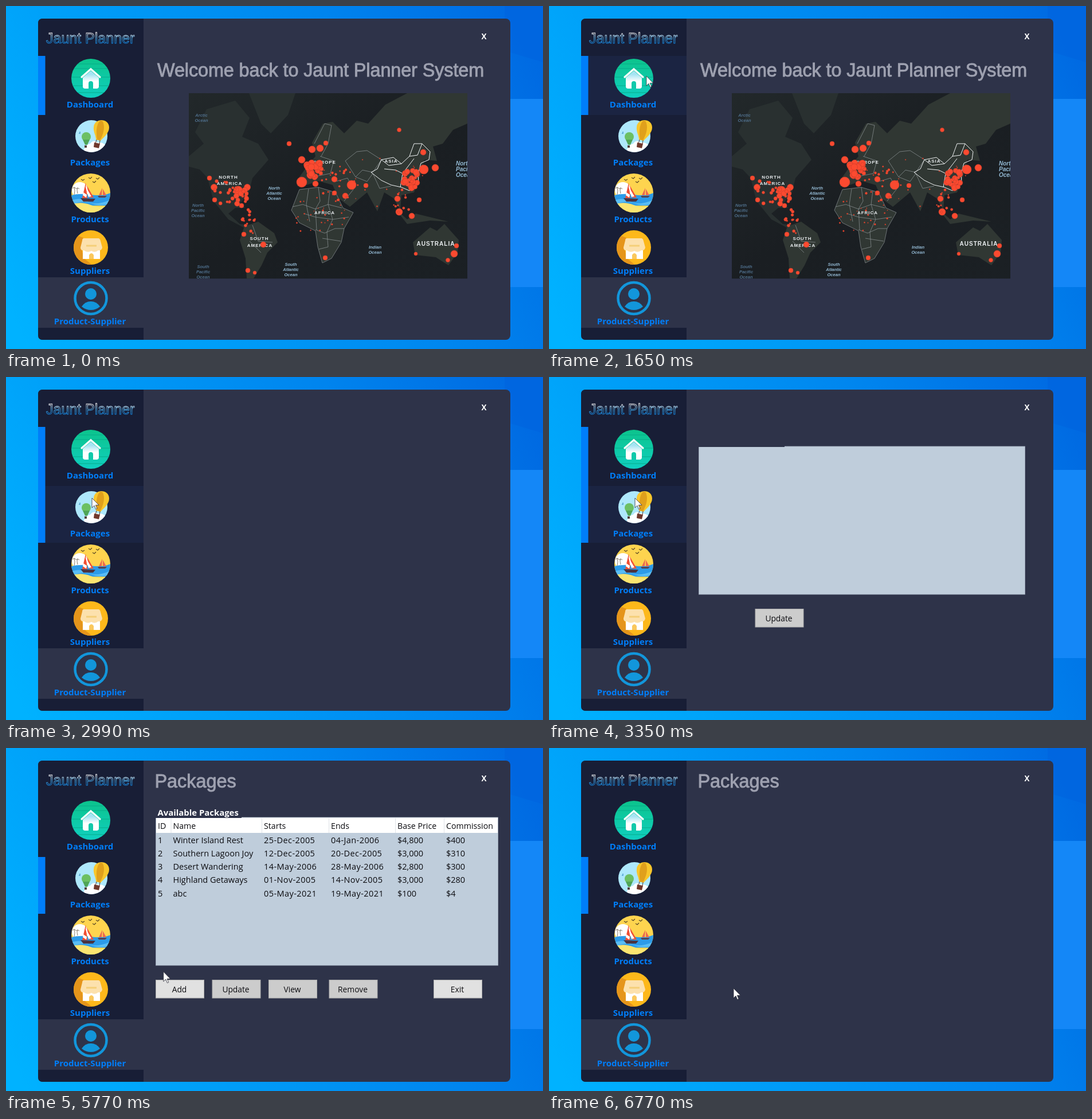
An HTML page for the animation above (8 s loop, 937 by 598 pixels).

```html
<!DOCTYPE html>
<html lang="en">
<head>
<meta charset="utf-8">
<title>Jaunt Planner</title>
<style>
html, body { margin: 0; width: 100%; height: 100%; overflow: hidden; background: #0098f4; }
svg { display: block; width: 100%; height: 100%; }
text { font-family: "Open Sans", "Noto Sans", sans-serif; }
.nav { font-size: 15px; font-weight: 700; fill: #007ef9; text-anchor: middle; }
.title { font: 32.4px "Liberation Sans", Arial, sans-serif; fill: #9ea1b0; stroke: #9ea1b0; stroke-width: .9; }
.logo { font: 25px "Liberation Sans", Arial, sans-serif; fill: none; stroke: url(#ink); stroke-width: .8; }
.land text { font: 700 8px "Liberation Sans", Arial, sans-serif; fill: #e8ecee; text-anchor: middle; letter-spacing: 1px; }
.land .sea { font-size: 7.5px; font-style: italic; fill: #93b9d3; letter-spacing: 0; }
.land .far { fill: #4f6f8c; }
.cell { font-size: 14.5px; fill: #0c0c10; }
.date { letter-spacing: .42px; }
.head { font-size: 14.2px; fill: #0c0c10; }
.btn { font-size: 13.8px; fill: #0c0c10; text-anchor: middle; }
</style>
</head>
<body>
<svg viewBox="0 0 937 598" preserveAspectRatio="none">
<defs>
  <linearGradient id="sky" gradientUnits="userSpaceOnUse" x1="0" y1="520" x2="937" y2="120">
    <stop offset="0" stop-color="#00b2ff"/><stop offset=".3" stop-color="#009ef8"/>
    <stop offset=".7" stop-color="#0084ee"/><stop offset="1" stop-color="#006ae2"/>
  </linearGradient>
  <linearGradient id="ink" gradientUnits="userSpaceOnUse" x1="0" y1="46" x2="0" y2="66">
    <stop offset=".1" stop-color="#fff"/><stop offset=".55" stop-color="#4ab4f4"/><stop offset="1" stop-color="#0a86e8"/>
  </linearGradient>
  <linearGradient id="photo" x1="0" y1="0" x2="1" y2="1">
    <stop offset="0" stop-color="#22282a"/><stop offset=".5" stop-color="#1a1e22"/><stop offset="1" stop-color="#1b2024"/>
  </linearGradient>
  <linearGradient id="green" x1="0" y1="0" x2="0" y2="1">
    <stop offset="0" stop-color="#0cc48c"/><stop offset="1" stop-color="#10cfc0"/>
  </linearGradient>
  <linearGradient id="wall" x1="0" y1="0" x2="0" y2="1">
    <stop offset=".2" stop-color="#a5e4f3"/><stop offset=".6" stop-color="#fff"/>
  </linearGradient>
  <clipPath id="frame"><rect x="319" y="152" width="486" height="323.500"/></clipPath>
  <clipPath id="disc1"><circle cx="148" cy="126" r="34"/></clipPath>
  <clipPath id="disc2"><circle cx="149" cy="227" r="28"/></clipPath>
  <clipPath id="disc3"><circle cx="148" cy="326" r="34"/></clipPath>
  <clipPath id="disc4"><circle cx="148" cy="421" r="30"/></clipPath>
</defs>

<rect width="937" height="598" fill="url(#sky)"/>
<path d="M870 78L937 98V0H870Z" fill="#0058d6" opacity=".25"/>
<rect x="870" y="162" width="67" height="328" fill="#1487f7"/>

<rect x="56" y="22" width="824" height="560" rx="8" fill="#2e3349"/>
<path d="M240 22H64Q56 22 56 30V574Q56 582 64 582H240Z" fill="#181e36"/>
<rect x="56" y="473" width="184" height="88" fill="#2e3349"/>
<rect id="hover" x="56" width="184" fill="#1b2442"/>
<rect id="bar" x="56" width="12.500" fill="#007ef9"/>
<text class="logo" x="70" y="65">Jaunt Planner</text>
<text x="834" y="58" font-size="13.5" font-weight="700" fill="#fff" text-anchor="middle">X</text>

<g clip-path="url(#disc1)">
  <rect x="114" y="92" width="68" height="68" fill="url(#green)"/>
  <path d="M114 101H182M114 109H182M114 124H182M114 139H182M114 151H182" stroke="#07a988" stroke-width="2" opacity=".45"/>
</g>
<path d="M134 125L148 113 162 125V140Q162 144 158 144H138Q134 144 134 140Z" fill="url(#wall)"/>
<path d="M132 124L148 110 164 124" fill="none" stroke="#fff" stroke-width="3.200" stroke-linecap="round"/>
<path d="M144 144V135Q144 131 148 131T152 135V144Z" fill="#0fc9aa"/>

<g clip-path="url(#disc2)">
  <rect x="121" y="199" width="56" height="56" fill="#aee8fc"/>
  <path d="M134 256Q138 241 147 240 152 232 160 238 168 236 178 246V256Z" fill="#fff"/>
</g>
<circle cx="140" cy="228" r="8" fill="#6cc063"/><path d="M134 233L138 242H142L146 233Z" fill="#4fa557"/>
<rect x="137" y="243" width="4" height="4" fill="#54433d"/>
<path d="M153 211C154 195 180 195 180 212 180 222 169 230 165 235L157 233C157 226 152 219 153 211Z" fill="#f8c62c"/>
<path d="M164 200C157 207 157 222 159 233L164 234C170 224 174 209 168 200Z" fill="#e0a01c"/>
<path d="M158 233L156 240M164 234L163 241" stroke="#54352b"/>
<path d="M154 238L164 240 162 248 153 246Z" fill="#70382b"/>
<path d="M127 222H130M129 219V221" stroke="#247cb8"/>

<g clip-path="url(#disc3)">
  <rect x="114" y="292" width="68" height="68" fill="#fed44f"/>
  <circle cx="129" cy="321" r="14" fill="#fff"/>
  <path d="M114 330Q128 326 148 329T182 326V348H114Z" fill="#2c9be9"/>
  <path d="M114 339Q128 333 142 341T182 338V345Q162 350 148 344T114 347Z" fill="#59bdf5"/>
  <path d="M114 346Q130 340 148 347T182 345V360H114Z" fill="#fbe570"/>
</g>
<path d="M119 329Q121 322 119 316M125 327Q123 321 125 317M116 318L119 316 122 318M122 319L125 317 128 319" fill="none" stroke="#675944" stroke-width=".8"/>
<path d="M139 308L133 335H142ZM141 313L153 334H145Z" fill="#f04f34"/>
<path d="M138 313L144 333 149 332ZM135 325L141 329 140 334 134 330Z" fill="#fff"/>
<path d="M130 335L156 336 152 341H135Z" fill="#4a3442"/>
<path d="M168 317L162 330H167ZM169 319L175 330H169Z" fill="#ec6951"/><path d="M160 331H176L173 334H162Z" fill="#574452"/>
<path d="M131 302L134 304 137 302M144 299L147 301 150 298M151 306L154 308 157 305M157 300L160 302 163 299" fill="none" stroke="#594725" stroke-width="1.200"/>

<g clip-path="url(#disc4)">
  <rect x="118" y="391" width="60" height="60" fill="#fdb81b"/>
  <path d="M118 398L135 404 131 420 136 440 150 451H118Z" fill="#e5951b"/>
</g>
<rect x="134" y="418" width="30" height="23" fill="#fff"/>
<path d="M136 405H161Q164 405 165 410L168 421Q167 427 161 426 155 431 149 427 142 431 136 426 130 427 130 421L133 409Q133 405 136 405Z" fill="#fce1ad"/>
<path d="M140 418H158" stroke="#f4cf78" stroke-width="3"/>
<path d="M145 441V434Q149 428 153 434V441Z" fill="#fac85c"/>

<circle cx="148" cy="509.500" r="27.500" fill="none" stroke="#1296db" stroke-width="4.500"/>
<circle cx="148" cy="502" r="10" fill="#1296db"/>
<path d="M132 524Q138 515 148 515T164 524Q157 530 148 530T132 524Z" fill="#1296db"/>

<g id="nav"></g>

<g id="welcome">
  <text class="title" x="264" y="123" letter-spacing="-.1">Welcome back to Jaunt Planner System</text>
  <g class="land" clip-path="url(#frame)">
    <rect x="319" y="152" width="486" height="323.500" fill="url(#photo)"/>
    <path d="M319 262L345 240 330 220 350 180 400 165 425 195 412 228 440 240 458 268 430 300 424 325 408 345 418 352 400 352 388 362 408 380 425 382 418 388 388 372 362 340 352 300 338 285 319 280ZM424 152H505L492 190 462 222 445 205Z" fill="#293030"/>
    <g fill="#303733">
      <path d="M416 384L440 376 468 396 474 412 456 430 446 452 432 475H420L418 440 408 408Z"/>
      <path id="africa" d="M512 320L545 316 575 325 588 352 606 360 590 388 585 412 568 440 552 448 544 420 540 392 512 378 498 356Z"/>
      <path d="M508 314L512 298 525 280 540 262 534 238 553 205 570 202 590 222 612 200 632 205 662 172 700 152H805V205L780 216 762 240 745 245 752 270 730 268 722 300 712 325 690 330 688 355 676 335 660 325 648 358 630 325 600 350 580 335 570 312 545 305 525 312Z"/>
      <path d="M710 412L740 386 752 392 765 380 790 408 788 430 772 452 750 438 714 434ZM678 352L700 372 715 362 772 376 740 374 700 380Z"/>
    </g>
    <g fill="none" stroke="#c3cbd0" stroke-width=".7" opacity=".65">
      <use href="#africa"/>
      <path d="M500 350L518 346 540 354 562 346 586 352M528 319L524 346 530 376M545 316L548 340 540 354 542 390M565 322L562 346 570 372 560 394 562 420 546 424M540 390L556 396 574 388 590 388M520 362L540 368 570 372 598 368M552 405L584 410"/>
      <path d="M592 270L612 254 630 252 655 268 640 290 622 286 610 298ZM610 298L630 306 640 292 652 318 672 314M538 240L556 205 568 208 562 240 550 262M548 262L572 270 566 292 545 296M430 382L440 410 465 412M425 410L445 430M575 306L596 300 606 320 590 340"/>
    </g>
    <path d="M637 290L648 284 655 268 676 264 690 275 704 262 712 240 726 240 740 254 738 268 724 274 719 292 720 308 704 322 690 316 672 312 655 304ZM660 284L680 286 692 292 712 266M692 292L688 316M655 268L668 278 690 275M704 262L718 260 726 240" fill="none" stroke="#eef1f2"/>
    <g id="labels"></g>
    <g id="dots" fill="#fb4a30" stroke="#c93e2c" stroke-width=".6"></g>
  </g>
</g>

<g id="grid">
  <rect id="sheet" x="261.500" y="121" height="258" fill="#bfcddb" stroke="#a4afbd" stroke-width=".8"/>
  <g id="head"></g>
  <rect x="261" y="119" width="150" height="3" fill="#2e3349"/>
</g>
<g id="rows"></g>
<g id="buttons"></g>
<text id="title" class="title" x="259.500" y="69">Packages</text>
<text id="caption" x="264.500" y="117.500" font-size="14.900" font-weight="700" fill="#fff">Available Packages</text>

<circle id="click" r="15" fill="#eaff3c" opacity=".45"/>
<path id="cursor" d="M0 0V17L4 13.200 6.600 19.500 9 18.500 6.400 12.300H12Z" fill="#fff" stroke="#2a2a35" stroke-width=".8"/>
</svg>

<script>
const LOOP = 8000;
const $ = id => document.getElementById(id);
const label = (cls, x, y, s, extra = "") => `<text class="${cls}" x="${x}" y="${y}" ${extra}>${s}</text>`;
const show = (id, on) => $(id).setAttribute("visibility", on ? "visible" : "hidden");
const set = (id, attrs) => { for (const k in attrs) $(id).setAttribute(k, attrs[k]); };

$("nav").innerHTML = [["Dashboard", 176.5], ["Packages", 278], ["Products", 376.5],
  ["Suppliers", 466.5], ["Product-Supplier", 555]].map(([s, y]) => label("nav", 146.5, y, s)).join("");

// Map labels and markers
const seas = [["Arctic Ocean", 341, 193, " far"], ["North Atlantic Ocean", 468, 320, ""],
  ["North Pacific Ocean", 335, 350, " far"], ["South Pacific Ocean", 344, 457, " far"],
  ["South Atlantic Ocean", 497, 453, ""], ["Indian Ocean", 644, 423, ""]];
$("labels").innerHTML =
  [["NORTH", 388, 301], ["AMERICA", 390, 312], ["EUROPE", 556, 275], ["ASIA", 672, 273], ["AFRICA", 556, 363],
   ["SOUTH", 442, 408], ["AMERICA", 443, 420]].map(([s, x, y]) => label("", x, y, s)).join("") +
  label("", 750, 418, "AUSTRALIA", 'style="font-size:10px"') +
  seas.map(([s, x, y, cls]) => s.split(" ").map((w, i) => label("sea" + cls, x, y + i * 9, w)).join("")).join("") +
  ["North", "Pacific", "Ocean"].map((w, i) =>
    label("sea", 785, 278 + i * 10, w, 'style="font-size:10px;text-anchor:start"')).join("");

let seed = 7;
const rnd = () => (seed = seed * 16807 % 2147483647) / 2147483647;
const dot = (x, y, r) => `<circle cx="${x.toFixed(1)}" cy="${y.toFixed(1)}" r="${r.toFixed(1)}"/>`;
const cluster = (x, y, w, h, n, r) => Array.from({ length: n }, () => {
  const a = rnd() * 6.283, d = Math.sqrt(rnd());
  return dot(x + w * d * Math.cos(a), y + h * d * Math.sin(a), r * (.5 + rnd() * .7));
}).join("");
const spots = [[494,240,4], [516,268,6], [534,250,6], [548,248,6], [558,239,4], [686,216,3.5], [728,255,5], [729,285,8],
  [749,282,6], [603,312,8], [573,302,5], [628,313,4], [592,331,5], [573,326,4], [355,300,4], [363,316,5.5],
  [364,338,4], [421,316,5.5], [405,322,8], [411,348,4], [415,398,4], [449,416,5], [422,461,4], [434,465,3],
  [557,439,4], [683,336,5], [686,359,6], [708,366,5], [721,338,4], [782,432,6], [786,418,4], [771,443,3.5],
  [715,432,3], [516,307,9], [540,310,5]];
$("dots").innerHTML = spots.map(s => dot(...s)).join("") +
  cluster(537, 284, 14, 16, 34, 5) + cluster(403, 331, 20, 16, 20, 4) + cluster(384, 322, 26, 24, 12, 2.5) +
  cluster(706, 301, 14, 18, 28, 4.5) + cluster(692, 342, 14, 22, 8, 2) + cluster(420, 380, 18, 30, 14, 2.5) +
  cluster(548, 370, 46, 45, 28, 1.2) + cluster(580, 310, 34, 30, 20, 1.8) + cluster(650, 310, 110, 50, 18, 1.1);

// Package table
const cols = [265, 291.5, 450, 567, 683, 768];
$("head").innerHTML = '<rect id="strip" x="262" y="121.5" height="26.5" fill="#fff"/>' +
  ["ID", "Name", "Starts", "Ends", "Base Price", "Commission"].map((s, i) =>
    (i ? `<path d="M${cols[i] - 3.5} 122V148" stroke="#dfe3e8"/>` : "") + label("head", cols[i], 140.5, s)).join("");
$("rows").innerHTML = [
  "1|Winter Island Rest|25-Dec-2005|04-Jan-2006|$4,800|$400",
  "2|Southern Lagoon Joy|12-Dec-2005|20-Dec-2005|$3,000|$310",
  "3|Desert Wandering|14-May-2006|28-May-2006|$2,800|$300",
  "4|Highland Getaways|01-Nov-2005|14-Nov-2005|$3,000|$280",
  "5|abc|05-May-2021|19-May-2021|$100|$4"
].map((row, r) => row.split("|").map((s, c) =>
  label(c === 2 || c === 3 ? "cell date" : "cell", cols[c], 165.5 + r * 23.3, s)).join("")).join("");

$("buttons").innerHTML = [["Add", 261, "#e1e1e1"], ["Update", 359.5, "#ccc"], ["View", 458, "#ccc"],
  ["Remove", 563.5, "#ccc"], ["Exit", 746, "#e1e1e1"]].map(([s, x, fill]) =>
  `<g id="b${s}"><rect id="r${s}" x="${x + .5}" y="404.500" width="84" height="31.500" fill="${fill}" stroke="#adadad"/>` +
  label("btn", x + 41.5, 426, s) + "</g>").join("");

// Pointer keys: time, x, y
const path = [[30, 640, 559], [80, 640, 559], [130, 572, 541], [390, 572, 541], [640, 368, 253], [880, 368, 253],
  [1250, 215, 150], [1600, 170, 122], [1650, 170, 122], [1700, 165, 126], [1950, 153, 174], [2060, 153, 174],
  [2600, 150, 211], [4380, 150, 211], [4570, 150, 327], [5530, 150, 327], [5870, 326, 416], [5980, 326, 416],
  [6180, 322, 419]];
function pointer(t) {
  const i = path.findIndex(k => k[0] > t);
  if (i < 0) return path[path.length - 1].slice(1);
  if (!i) return path[0].slice(1);
  const [t0, x0, y0] = path[i - 1], [t1, x1, y1] = path[i], p = (t - t0) / (t1 - t0);
  return [x0 + (x1 - x0) * p, y0 + (y1 - y0) * p];
}

const edges = [87, 190, 289, 385, 473];
function draw(t) {
  const [x, y] = pointer(t);
  set("cursor", { transform: `translate(${x} ${y})` });
  show("cursor", t >= 30);
  set("click", { cx: x, cy: y });
  show("click", t >= 2650 && t < 2860);

  const n = edges.findIndex((e, i) => y >= e && y < edges[i + 1]);
  const over = x > 56 && x < 240 && n >= 0;
  show("hover", over);
  if (over) set("hover", { y: edges[n], height: edges[n + 1] - edges[n] });

  const top = t < 3600 ? 87 : 190, end = t < 2910 ? 190 : 289;
  set("bar", { y: top, height: end - top });

  const open = t < 6770, full = t >= 3600 && open, mid = t >= 3390 && open;
  show("welcome", t < 2910);
  show("grid", t >= 3350 && open);
  show("head", mid);
  const w = t < 3390 ? 569 : t < 3600 ? 588 : 597;
  set("sheet", { width: w });
  set("strip", { width: w - 1 });
  show("bUpdate", t >= 3350 && open);
  for (const s of ["Add", "View", "Remove", "Exit"]) show("b" + s, mid);
  show("rows", full);
  show("caption", full);
  show("title", t >= 3600);

  const hot = x > 261 && x < 346 && y > 404 && y < 436;
  const down = t >= 6570 && t < 6670;
  set("rAdd", { fill: down ? "#cce4f7" : hot ? "#e5f1fb" : "#e1e1e1", stroke: hot ? "#0078d7" : "#adadad" });
}

function tick(now) {
  draw(now % LOOP);
  requestAnimationFrame(tick);
}
draw(0);
requestAnimationFrame(tick);
</script>
</body>
</html>
```
